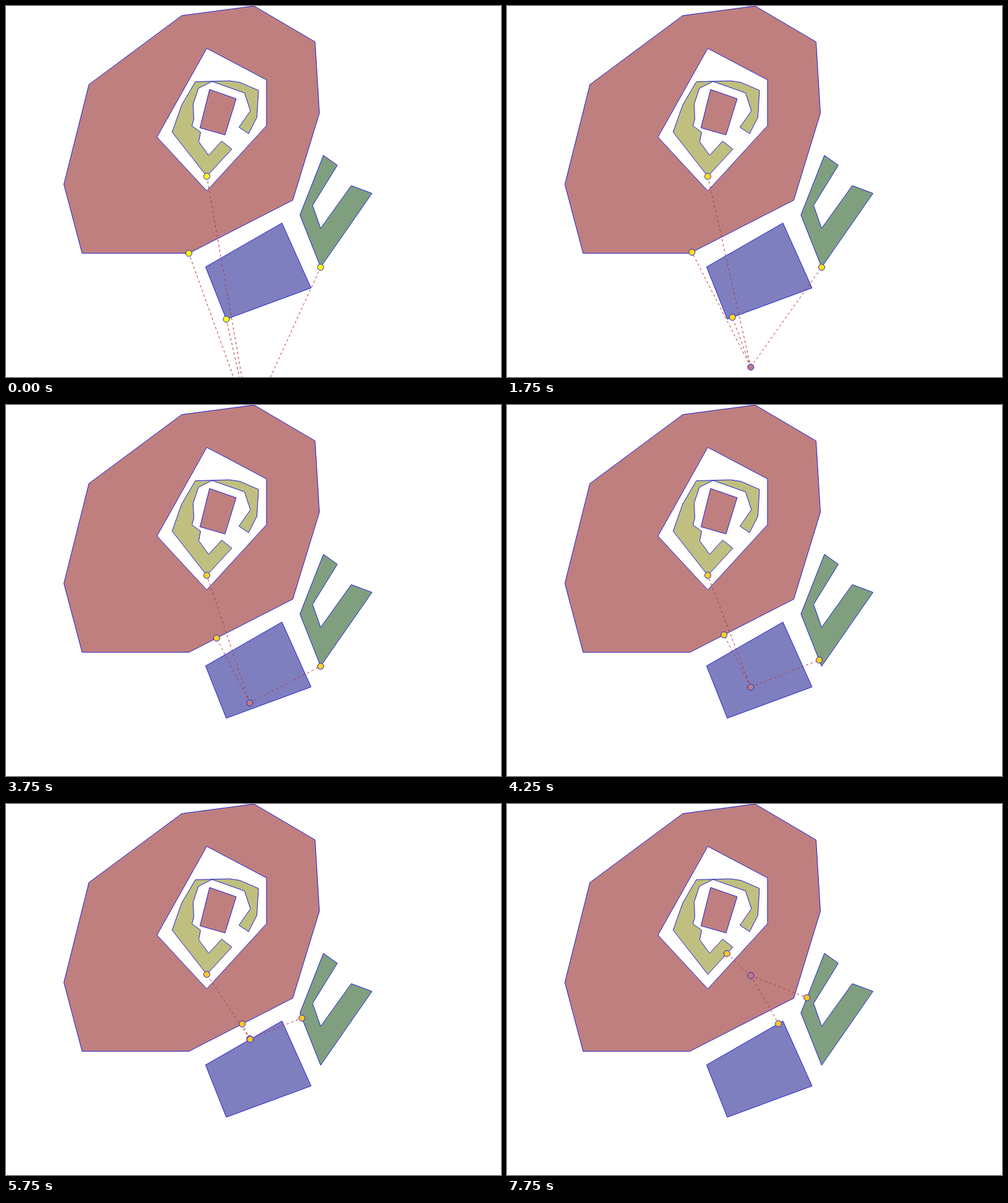
These frames come from a looping animation (800x600 px, 8000 ms). An HTML page with a canvas:

```html
<!DOCTYPE html>
<html lang="en">
<head>
<meta charset="utf-8">
<title>Nearest points</title>
<style>
  html, body { margin: 0; width: 100%; height: 100%; overflow: hidden; background: #fff; }
  canvas { display: block; }
</style>
</head>
<body>
<canvas id="stage" width="800" height="600"></canvas>
<script>
const ctx = document.getElementById('stage').getContext('2d');
const STEP = 250, STEPS = 32;
const RED = '#bf7f7f', OUTLINE = '#1c1cd2', LINK = '#b43434';

// Builds a closed shape from one corner string per ring.
function makeShape(fill, ...outlines) {
  const rings = outlines.map(text => text.split(' ').map(pair => pair.split(',').map(Number)));
  const path = new Path2D();
  for (const points of rings) {
    points.forEach(([x, y], i) => i ? path.lineTo(x, y) : path.moveTo(x, y));
    path.closePath();
  }
  return { fill, rings, path };
}

const shapes = [
  makeShape(RED,
    '134,127 284,15.5 401,0 499.5,58 506.5,173.5 463.5,314 295.5,400 123,400 93.5,288.5',
    '324.5,68.5 421,119.5 421,193.5 324.5,299 244,212',
    '329,135 372,150 354,208.5 313.5,197'),
  makeShape('#bfbf7f',
    '306,122.5 361,121 378,123.5 408,136.5 405.5,180 392,206.5 376.5,196 395,169.5 ' +
    '385.5,140.5 333,122 311,133 302.5,158.5 303.5,183 300.5,194 314.5,204 311.5,219.5 ' +
    '327.5,241.5 348.5,218.5 365,231.5 324.5,275.5 268.5,204 284,160'),
  makeShape('#7f7fbf', '322.5,422 446,351 493,456 356,506.5'),
  makeShape('#7f9f7f',
    '513,241.5 535.5,257.5 495.5,322.5 508.5,359.5 558,290.5 591.5,303 508.5,422.5 475,338')
];

// Markers drift from pure yellow to amber.
function markerColor(step) {
  const fade = Math.exp(-step / 10);
  return `hsl(${43 + 17 * fade}, 100%, ${58 - 8 * fade}%)`;
}

function projectOnSegment([px, py], [ax, ay], [bx, by]) {
  const dx = bx - ax, dy = by - ay;
  const t = ((px - ax) * dx + (py - ay) * dy) / (dx * dx + dy * dy);
  const f = Math.min(1, Math.max(0, t));
  return [ax + f * dx, ay + f * dy];
}

function nearestPoint(point, rings) {
  let best, bestDistance = Infinity;
  for (const points of rings) {
    points.forEach((a, i) => {
      const candidate = projectOnSegment(point, a, points[(i + 1) % points.length]);
      const distance = Math.hypot(candidate[0] - point[0], candidate[1] - point[1]);
      if (distance < bestDistance) {
        best = candidate;
        bestDistance = distance;
      }
    });
  }
  return best;
}

function drawShape(path, fill) {
  ctx.fillStyle = fill;
  ctx.fill(path, 'evenodd');
  ctx.strokeStyle = OUTLINE;
  ctx.stroke(path);
}

function drawDot([x, y], fill) {
  const path = new Path2D();
  path.arc(x, y, 5, 0, Math.PI * 2);
  drawShape(path, fill);
}

function drawLink(from, to) {
  ctx.beginPath();
  ctx.moveTo(...from);
  ctx.lineTo(...to);
  ctx.strokeStyle = LINK;
  ctx.setLineDash([4, 4]);
  ctx.stroke();
  ctx.setLineDash([]);
}

function draw(step) {
  const query = [394, 673.4 - 12.77 * step];

  ctx.fillStyle = '#fff';
  ctx.fillRect(0, 0, 800, 600);
  shapes.forEach(shape => drawShape(shape.path, shape.fill));

  const targets = shapes
    .filter(shape => !ctx.isPointInPath(shape.path, ...query, 'evenodd'))
    .map(shape => nearestPoint(query, shape.rings));
  targets.forEach(target => drawLink(query, target));
  drawDot(query, RED);
  targets.forEach(target => drawDot(target, markerColor(step)));
}

const start = performance.now();
function tick() {
  draw(Math.floor((performance.now() - start) / STEP) % STEPS);
  requestAnimationFrame(tick);
}
tick();
</script>
</body>
</html>
```
